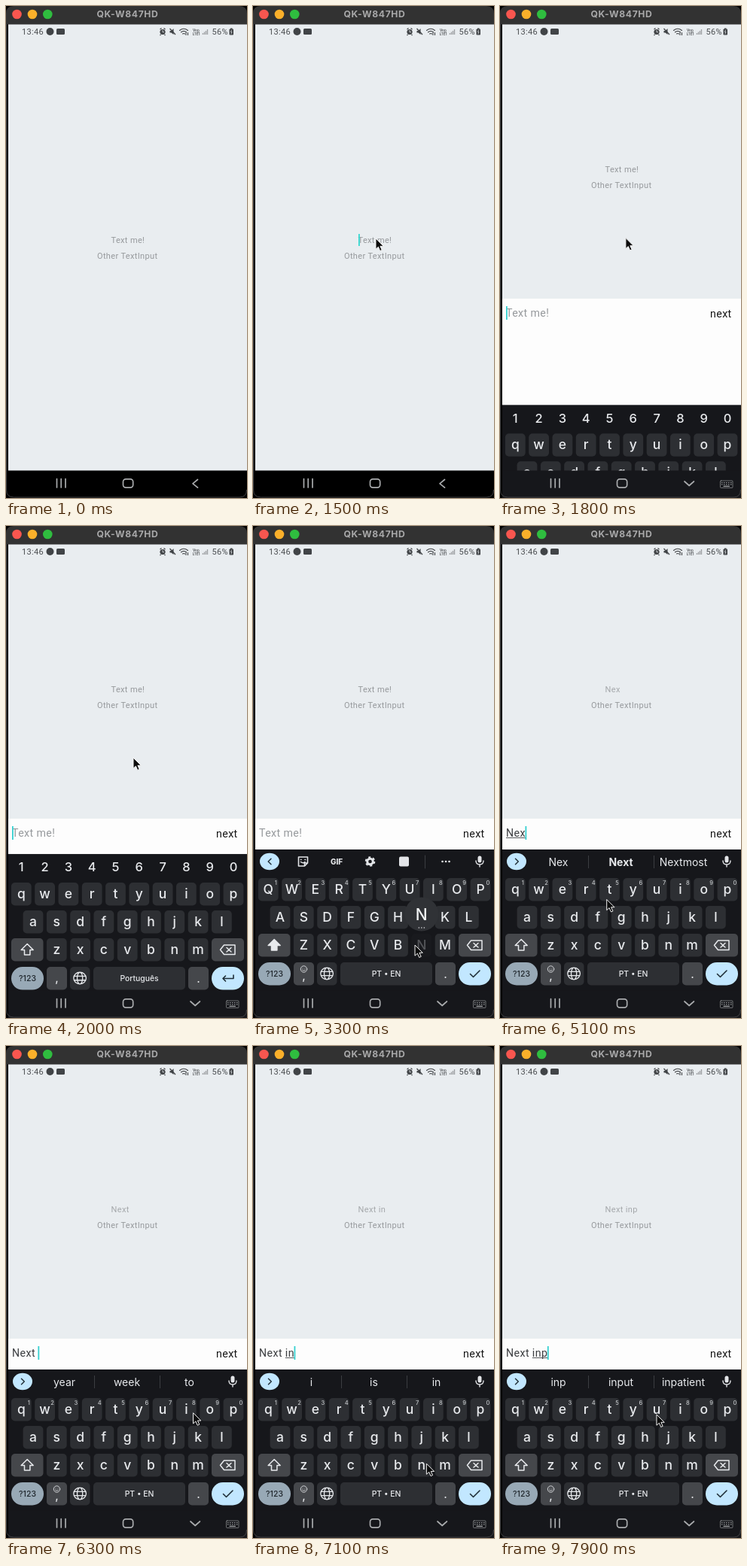
Animation of 320 by 654 pixels, one loop 8000 ms. Source, as an HTML page:

```html
<!DOCTYPE html>
<html lang="en">
<head>
<meta charset="utf-8">
<title>Text input demo</title>
<style>
html, body { margin: 0; width: 100%; height: 100%; overflow: hidden; background: #000; }
svg { display: block; width: 320px; height: 654px; }
text { white-space: pre; font-family: Inter, sans-serif; }
.app { font: 11px Roboto, sans-serif; letter-spacing: .35px; fill: #96999c; }
.field { font: 14.2px Roboto, sans-serif; letter-spacing: .4px; }
.mid { text-anchor: middle; }
.line { fill: none; stroke-linecap: round; stroke-linejoin: round; }
</style>
</head>
<body>
<svg id="stage" viewBox="0 0 320 654">
  <rect width="320" height="654" fill="#000"/>
  <rect x="3" y="24" width="317" height="594" fill="#e9edf0"/>

  <g id="status" fill="#414447">
    <text class="app" x="21" y="38" style="fill:#4b4e51">13:46</text>
    <circle cx="58.5" cy="34" r="5"/>
    <rect x="67" y="30" width="11" height="8" rx="1.5"/>
    <circle cx="208" cy="34.5" r="3.6"/>
    <path d="M204.5 31l2-1.5M211.5 31l-2-1.5M205.5 38l-1 1M210.5 38l1 1" stroke="#414447" stroke-width="1.2"/>
    <path d="M208 32.5v2.2h1.6" class="line" stroke="#e9edf0" stroke-width=".8"/>
    <path d="M217.5 33h2l3-3v8l-3-2.5h-2z"/>
    <path d="M217.5 30l7.5 8" stroke="#414447" stroke-width="1.2"/>
    <path class="line" d="M230.5 32.5q5.5-4.5 11 0M232.5 34.8q3.5-2.8 7 0M234.5 37q1.5-1 3 0M239 38.5v-3M241.5 35.5v3" stroke="#414447" stroke-width="1.1"/>
    <text class="mid" x="252.5" y="33.5" font-size="4.5" font-weight="600">Vo))</text>
    <text class="mid" x="252.5" y="38.5" font-size="4.5" font-weight="600">LTE1</text>
    <path d="M261.5 38v-2M263.5 38v-3.5M265.5 38v-5M267.5 38v-7" stroke="#9b9ea1" stroke-width="1.3"/>
    <text class="app" x="273.5" y="38" style="fill:#4b4e51">56%</text>
    <rect x="296.5" y="30.5" width="5.5" height="8" rx="1"/>
    <rect x="298" y="29.5" width="2.5" height="1.5"/>
    <path d="M299.5 32l-1 2.5h1.5l-1 2.5" class="line" stroke="#e9edf0" stroke-width=".7"/>
  </g>

  <g id="form">
    <text id="label" class="app" x="139.5" y="315"></text>
    <text class="app" x="121" y="335.5">Other TextInput</text>
    <rect id="inlineCaret" x="140" y="303" width="1.8" height="16" fill="#35d8d0"/>
  </g>

  <g id="bar">
    <rect x="3" y="389" width="317" height="229" fill="#fdfdfd"/>
    <text id="field" class="field" x="8" y="413"></text>
    <path id="under" stroke="#55585b"/>
    <rect id="caret" y="399" width="1.8" height="18" fill="#35d0d0"/>
    <text class="field" x="279" y="414" fill="#151515">next</text>
  </g>

  <g id="board">
    <rect x="3" y="430" width="317" height="224" fill="#16171b"/>
    <g id="digits" fill="#e8eaed" font-size="16.5" font-weight="500"></g>
    <g id="strip">
      <ellipse cx="22" cy="446" rx="13" ry="11.2" fill="#c2e7ff"/>
      <path id="chevron" class="line" stroke="#22303a" stroke-width="1.5"/>
      <g id="tools" class="line" stroke="#e3e5e8" stroke-width="1.6">
        <path d="M60.5 440h12v8l-4 4h-8zM72.5 448h-4v4M63.5 443.5h.5M69 443.5h.5M63.5 446.5q3 2.5 5.5 0"/>
        <text class="mid" x="111" y="450" font-size="10" font-weight="800" fill="#e3e5e8" stroke="none">GIF</text>
        <circle cx="155.5" cy="446" r="3.8" stroke-width="3"/>
        <circle cx="155.5" cy="446" r="5.8" stroke-width="2" stroke-linecap="butt" stroke-dasharray="3 3.07"/>
        <rect x="194" y="439.5" width="13" height="13" rx="2" fill="#e3e5e8" stroke="none"/>
        <path d="M228.5 438v17" stroke="#3b3d41" stroke-width="1"/>
        <path d="M251.5 446h.1M256 446h.1M260.5 446h.1" stroke-width="2.6"/>
      </g>
      <g id="words" fill="#e8eaed" font-size="14">
        <path d="M117.5 438v17M204.5 438v17" stroke="#3b3d41"/>
      </g>
      <rect x="298.5" y="438.5" width="5" height="9" rx="2.5" fill="#e3e5e8"/>
      <path class="line" d="M296 445q0 5 5 5t5-5M301 450v3" stroke="#e3e5e8" stroke-width="1.4"/>
    </g>
    <g id="keys"></g>
    <g id="popup">
      <circle r="22.5" fill="#303236"/>
      <text id="popText" class="mid" y="8" font-size="21" font-weight="500" fill="#f1f3f4"></text>
      <path class="line" d="M-3.5 18h.1M0 18h.1M3.5 18h.1" stroke="#d5d7da" stroke-width="1.6"/>
    </g>
  </g>

  <rect id="nav" x="3" y="617.5" width="317" height="37"/>
  <g class="line" stroke="#a9abad" stroke-width="1.7">
    <path d="M67.5 628.5v11.5M73.2 628.5v11.5M79 628.5v11.5"/>
    <rect x="155.5" y="628.8" width="13.2" height="11.4" rx="3.6"/>
    <path id="back"/>
    <g id="imeIcon" stroke-width="1.2">
      <rect x="292.5" y="631" width="16.5" height="9.5" rx="1" stroke-width=".6"/>
      <path d="M294.5 633.5h13M294.5 635.8h13" stroke-dasharray=".5 2.5"/>
      <path d="M297 638.3h7.5"/>
    </g>
  </g>

  <path d="M0 24.5V10Q0 0 10 0H310Q320 0 320 10V24.5z" fill="#323232"/>
  <path d="M.5 24V643Q.5 653 10.5 653H310Q319.5 653 319.5 643" fill="none" stroke="#424244"/>
  <circle cx="14.5" cy="11" r="6.3" fill="#f9564f"/>
  <circle cx="35" cy="11" r="6.3" fill="#fbb02a"/>
  <circle cx="55.3" cy="11" r="6.3" fill="#2fbd3f"/>
  <text class="mid" x="161.5" y="15" font-size="12.2" font-weight="700" letter-spacing=".6" fill="#a8a8a9">QK-W847HD</text>

  <path id="pointer" d="M0 0V14.2L3.4 11.2L5.7 16.5L8.2 15.4L5.9 10.3H10.3z" fill="#0b0b0b" stroke="#f4f4f4" stroke-linejoin="round"/>
</svg>
<script>
const LOOP = 8000, TAP = 1400, OPEN = 1700, OPENED = 2130, READY = 2150, TYPED = 3400;
const PICK_DELAY = 250, BOARD_HEIGHT = 224;
const $ = id => document.getElementById(id);

// time, text, start of the composing word, suggestions
const EDITS = [
  [OPEN, '', 0, null],
  [TYPED, 'N', 0, ['N', 'No', 'Na']],
  [4000, 'Ne', 0, ['Ne', 'New', 'Never']],
  [4700, 'Nex', 0, ['Nex', '*Next', 'Nextmost']],
  [5300, 'Next', 0, ['Next', 'Nexte', 'Nextmost']],
  [5900, 'Next ', 5, ['year', 'week', 'to']],
  [6500, 'Next i', 5, ['i', 'is', 'in']],
  [7000, 'Next in', 5, ['in', 'into', 'inside']],
  [7600, 'Next inp', 5, ['inp', 'input', 'inpatient']]
];
const PRESSES = [[3250, 'n'], [3950, 'e'], [4600, 'x'], [5200, 't'], [6400, 'i'], [6900, 'n'], [7500, 'p']];
const PRESS_TIME = 130;

// pointer stops: arrival, departure, x, y
const STOPS = [
  [600, 600, 190, 621], [1300, 1500, 163, 309], [2000, 2200, 169, 308], [3150, 3400, 215, 557],
  [3900, 4220, 82, 487], [4600, 4720, 97, 563], [5120, 5320, 142, 496], [5800, 5920, 180, 594],
  [6320, 6500, 249, 487], [6850, 7020, 223, 562], [7450, 7600, 302, 488], [7920, 8000, 207, 490]
];

function add(parent, tag, attrs, text) {
  const el = document.createElementNS('http://www.w3.org/2000/svg', tag);
  for (const k in attrs) el.setAttribute(k, attrs[k]);
  if (text) el.textContent = text;
  parent.appendChild(el);
  return el;
}
const set = (el, name, value) => {
  if (el.getAttribute(name) !== String(value)) el.setAttribute(name, value);
};
const write = (el, text) => { if (el.textContent !== text) el.textContent = text; };
const show = (el, on) => set(el, 'visibility', on ? 'inherit' : 'hidden');
const move = (el, x, y) => set(el, 'transform', `translate(${x.toFixed(2)} ${y.toFixed(2)})`);
const latest = (list, t) => list.filter(e => e[0] <= t).pop();

const keyLayer = $('keys'), letters = {}, hints = [];
const PLAIN = '#2d2f33', SIDE = '#45474b';
const box = (x, y, w, fill, rx = 5) =>
  add(keyLayer, 'rect', { x, y: y - 15, width: w, height: 30.5, rx, fill });
const label = (x, y, size, fill, text, weight = 500) =>
  add(keyLayer, 'text', { class: 'mid', x, y, 'font-size': size, 'font-weight': weight, fill }, text);
const icon = (d, stroke = '#e8eaed', width = 1.5) =>
  add(keyLayer, 'path', { class: 'line', d, stroke, 'stroke-width': width });

[['qwertyuiop', 20.3, 483], ['asdfghjkl', 36, 520], ['zxcvbnm', 67.3, 557]].forEach(([row, x0, y], r) => {
  [...row].forEach((c, i) => {
    const x = x0 + i * 31.3;
    letters[c] = { x, y, key: box(x - 13.4, y, 26.8, PLAIN), cap: label(x, y + 6, 17.5, '#e8eaed', c) };
    if (!r) hints.push(label(x + 10, y - 6, 7.5, '#c4c7ca', String((i + 1) % 10)));
  });
});
for (let i = 0; i < 10; i++)
  add($('digits'), 'text', { class: 'mid', x: 20.3 + i * 31.3, y: 453.2 }, String((i + 1) % 10));

box(7, 557, 42.5, SIDE);
const shift = icon('M28.2 549.5l-8 8h4.3v6.5h7.4v-6.5h4.3z');
box(273, 557, 43, SIDE);
icon('M289.5 551h14.5v12.5h-14.5l-5-6.25zM293 554.5l6 5.5M299 554.5l-6 5.5');
box(7, 595, 43, '#98a9b6', 15);
label(28.5, 599, 10.5, '#20272d', '?123');
box(54, 595, 27, SIDE);
const comma = label(67.5, 603, 15, '#e8eaed', ',');
const smile = [
  add(keyLayer, 'circle', { class: 'line', cx: 67.5, cy: 589, r: 4.2, stroke: '#d5d7da' }),
  icon('M66 588h.1M69 588h.1M65.5 590.3q2 1.8 4 0', '#d5d7da', .9)
];
box(85, 595, 26.5, PLAIN);
icon('M89.8 595a8.3 7.8 0 1 0 16.6 0a8.3 7.8 0 1 0-16.6 0zM94.5 595a3.6 7.8 0 1 0 7.2 0a3.6 7.8 0 1 0-7.2 0zM90.5 592.3h15M90.5 597.7h15', '#e8eaed', 1.3);
box(116, 595, 122, PLAIN);
const space = label(177, 598.7, 10.4, '#e8eaed');
box(242, 595, 27, SIDE);
label(255.5, 601, 15, '#e8eaed', '.');
box(273, 595, 43, '#c2e7ff', 15);
const enter = icon('', '#1f2e38', 1.6);

const words = [77.5, 160.5, 243.5].map(x => add($('words'), 'text', { class: 'mid', x, y: 451.5 }));

function pointerAt(t) {
  const i = Math.max(0, STOPS.findLastIndex(s => s[1] <= t));
  const [, t0, x0, y0] = STOPS[i], [t1, , x1, y1] = STOPS[i + 1] || STOPS[i];
  const u = Math.min(1, Math.max(0, (t - t0) / (t1 - t0 || 1)));
  const e = u * u * (3 - 2 * u);
  return [x0 + (x1 - x0) * e, y0 + (y1 - y0) * e];
}

function drawForm(t, open) {
  const [since, text, start] = latest(EDITS, t) || [0, '', 0];
  write($('label'), text || 'Text me!');
  set($('label'), 'style', text ? 'fill:#a5a8ab' : '');
  move($('form'), 0, open ? -94 : 0);
  show($('inlineCaret'), t >= TAP && !open);

  show($('bar'), open);
  const field = $('field');
  write(field, text || 'Text me!');
  set(field, 'fill', text ? '#3b3d40' : '#96999c');
  const width = n => n ? field.getSubStringLength(0, n) : 0;
  const end = 8 + width(text.length);
  set($('caret'), 'x', (text ? end - .4 : 8).toFixed(2));
  show($('caret'), open && (t - since) % 1000 < 500);
  show($('under'), start < text.length);
  if (start < text.length) set($('under'), 'd', `M${8 + width(start)} 414.5H${end}`);
}

function drawBoard(t, open) {
  const ready = t >= READY, upper = ready && t < TYPED;
  const left = Math.min(1, Math.max(0, (OPENED - t) / (OPENED - OPEN)));
  show($('board'), open);
  move($('board'), 0, BOARD_HEIGHT * left ** 3);

  const picks = (latest(EDITS, t - PICK_DELAY) || [])[3];
  show($('digits'), !ready);
  show($('strip'), ready);
  show($('tools'), ready && !picks);
  show($('words'), ready && !!picks);
  set($('chevron'), 'd', picks ? 'M20.5 442.3l3.8 3.7l-3.8 3.7' : 'M24 442.3l-3.8 3.7l3.8 3.7');
  if (picks) words.forEach((w, i) => {
    write(w, picks[i].replace('*', ''));
    set(w, 'font-weight', picks[i][0] === '*' ? 700 : 400);
  });

  const press = PRESSES.find(([p]) => t >= p && t < p + PRESS_TIME);
  for (const c in letters) {
    const { key, cap } = letters[c], down = press && press[1] === c;
    write(cap, upper ? c.toUpperCase() : c);
    set(cap, 'opacity', down ? .28 : 1);
    set(key, 'opacity', down ? .15 : 1);
  }
  hints.forEach(h => show(h, ready));
  smile.forEach(s => show(s, ready));
  set(comma, 'y', ready ? 603 : 600);
  set(shift, 'style', upper ? 'fill:#e8eaed' : '');
  write(space, ready ? 'PT • EN' : 'Português');
  set(enter, 'd', ready ? 'M288.5 595.5l4 4l8.5-8.5' : 'M302 591v4.5h-14M291.5 592l-3.5 3.5l3.5 3.5');

  show($('popup'), !!press);
  if (press) {
    const { x, y } = letters[press[1]];
    move($('popup'), Math.min(x, 297), y - 41);
    write($('popText'), upper ? press[1].toUpperCase() : press[1]);
  }
}

function render(t) {
  const open = t >= OPEN;
  drawForm(t, open);
  drawBoard(t, open);
  set($('nav'), 'fill', open ? '#16171b' : '#000');
  set($('back'), 'd', open ? 'M245 632l6.2 5.5l6.2-5.5' : 'M254.5 629.5l-6.5 5.3l6.5 5.3');
  show($('imeIcon'), open);
  show($('pointer'), t >= 600);
  move($('pointer'), ...pointerAt(t));
}

const origin = performance.now();
function frame() {
  render((performance.now() - origin) % LOOP);
  requestAnimationFrame(frame);
}
frame();
</script>
</body>
</html>
```
